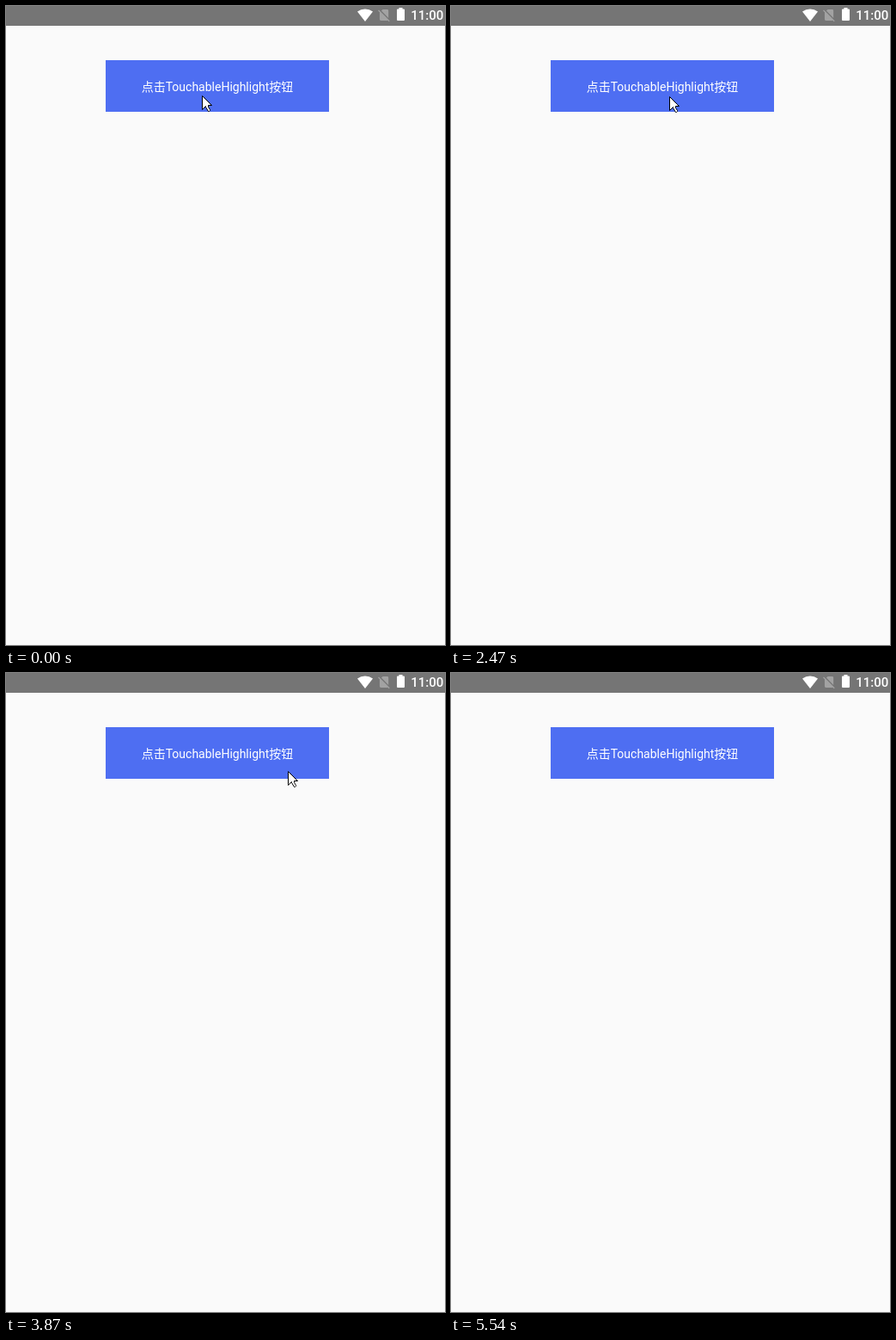
Write an HTML page that moves like this. It is 511x743 px and loops after 6230 ms.

```html
<!DOCTYPE html>
<html lang="zh">
<head>
<meta charset="utf-8">
<title>TouchableHighlight</title>
<style>
  html, body { margin: 0; width: 100%; height: 100%; overflow: hidden; background: #fafafa; }
  svg { display: block; width: 511px; height: 743px; }
  text { fill: #fff; font-family: Roboto, "Noto Sans CJK SC", "Noto Sans CJK", sans-serif; }
  .clock { font-size: 15px; font-weight: 500; }
  .label { font-size: 14px; text-anchor: middle; }
  .button { fill: #4e6ef2; }
  .button, .label, .cursor { animation: press 6230ms step-end infinite; }
  .label { animation-name: dim; }
  .cursor { animation-name: move; }

  @keyframes press {
    0%, 29.373%, 50.561%, 84.59%, 100% { fill: #4e6ef2; }
    17.977%, 41.572%, 69.02% { fill: #ffa500; }
  }
  @keyframes dim {
    0%, 29.373%, 50.561%, 84.59%, 100% { opacity: 1; }
    17.977%, 41.572%, 69.02% { opacity: .2; }
  }
  @keyframes move {
    0% { transform: translate(228px, 104px); }
    31.3% { transform: translate(231px, 121px); }
    33.386% { transform: translate(240px, 139px); }
    35.794% { transform: translate(248px, 130px); }
    37.72% { transform: translate(253px, 112px); }
    39.646% { transform: translate(254px, 105px); }
    52.969% { transform: translate(256px, 114px); }
    55.377% { transform: translate(269px, 150px); }
    57.303% { transform: translate(286px, 164px); }
    59.871% { transform: translate(321px, 121px); }
    62.118% { transform: translate(328px, 114px); }
    86.516% { transform: translate(466px, 529px); }
    88.924%, 100% { transform: translate(-40px, -40px); }
  }
</style>
</head>
<body>
<svg viewBox="0 0 511 743">
  <rect width="511" height="743" fill="#fafafa"/>

  <!-- Status bar -->
  <rect width="511" height="23" fill="#757575"/>
  <path d="M418 18 L409 6.6 Q413 3.5 418 3.5 T427 6.6 Z" fill="#fff"/>
  <path transform="translate(431.3 1.7) scale(.73)" fill="#fff" opacity=".33"
    d="M19 5c0-1.1-.9-2-2-2h-7L7.66 5.34 19 16.68zM3.65 3.88L2.38 5.15 5 7.77V19c0 1.1.9 2 2 2h10c.35 0 .67-.1.96-.26l1.88 1.88 1.27-1.27z"/>
  <path d="M457.5 2h4v1.5h1.5q1 0 1 1V16q0 1-1 1h-7q-1 0-1-1V4.5q0-1 1-1h1.5z" fill="#fff"/>
  <text class="clock" x="471.2" y="16">11:00</text>

  <rect class="button" x="116" y="63" width="260" height="60"/>
  <text class="label" x="246" y="99">点击TouchableHighlight按钮</text>

  <g class="cursor">
    <path transform="translate(.5 .5)" fill="#fff" stroke="#000" stroke-linejoin="round"
      d="M0 0V16L4 12V13L7 18H8L9 17V16L7 13V11H11Z"/>
  </g>
</svg>
</body>
</html>
```
